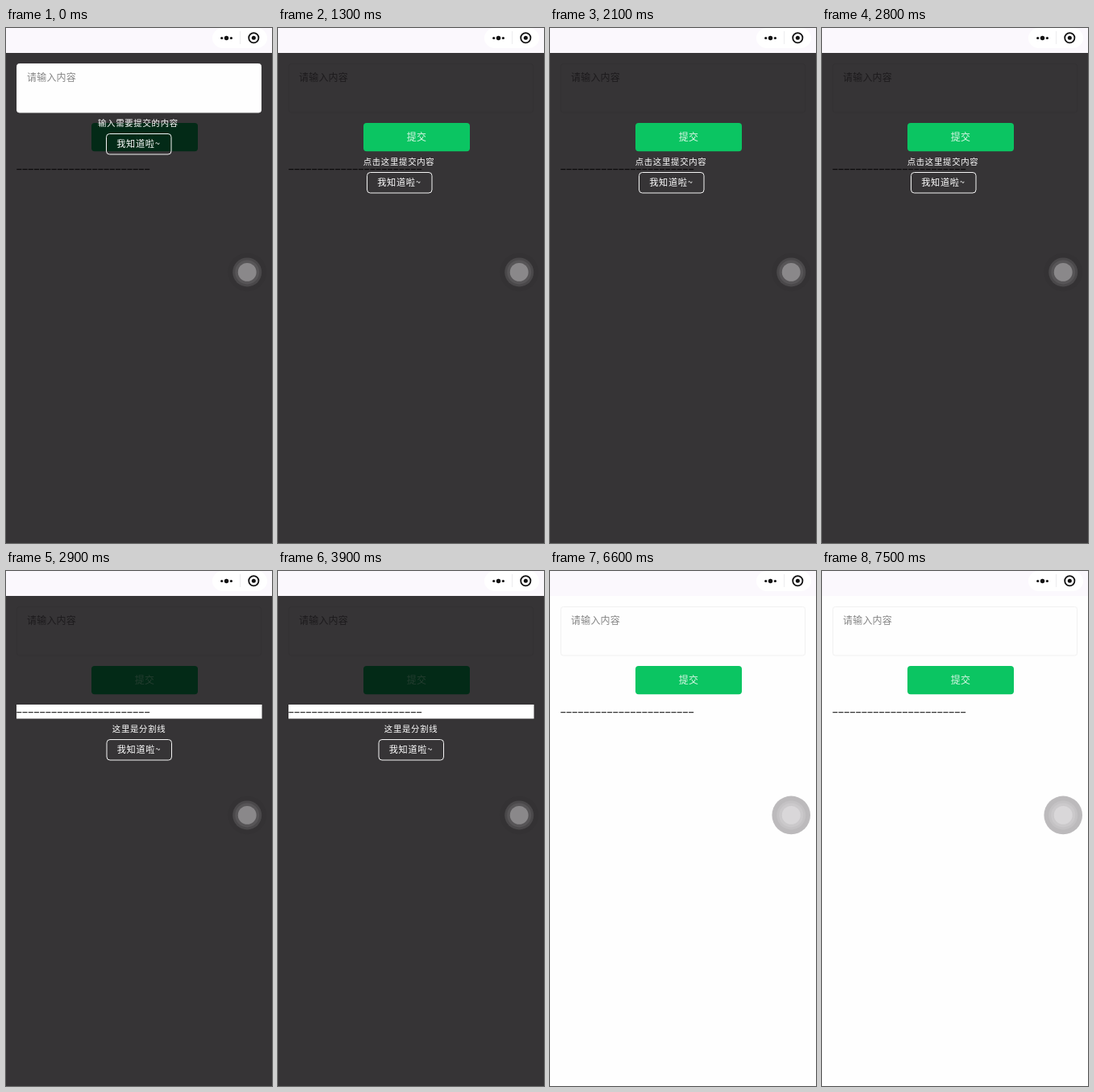
Write an HTML page that moves like this. It is 330x640 px and loops after 7600 ms.

```html
<!DOCTYPE html>
<html lang="zh">
<head>
<meta charset="utf-8">
<style>
  html, body { margin: 0; width: 100%; height: 100%; overflow: hidden; background: #fefefe; }
  svg { display: block; }
  text { font: 12px "Noto Sans CJK SC", "Noto Sans CJK", sans-serif; letter-spacing: .2px; }
  #tip text { fill: #fff; font-size: 10.4px; letter-spacing: .7px; }
  #tip g text { font-size: 11.2px; }
</style>
</head>
<body>
<svg width="330" height="640" viewBox="0 0 330 640">
  <rect id="page" width="330" height="640"/>
  <rect width="330" height="31" fill="#fbf8fd"/>
  <rect x="256" y="0" width="68" height="25" rx="12.5" fill="#fff"/>
  <path d="M290.5 4V20" stroke="#ececee"/>
  <g fill="#111">
    <circle cx="267.7" cy="12.5" r="1.6"/>
    <circle cx="273.5" cy="12.5" r="2.7"/>
    <circle cx="279.4" cy="12.5" r="1.6"/>
    <circle cx="307.3" cy="12.3" r="2.5"/>
    <circle cx="307.3" cy="12.3" r="6.1" fill="none" stroke="#111" stroke-width="1.8"/>
  </g>

  <rect id="area" x="13.5" y="44.5" width="303" height="60.5" rx="3"/>
  <text id="hint" x="26" y="66.3">请输入内容</text>
  <rect id="button" x="106" y="118" width="132" height="35.3" rx="4"/>
  <text id="label" x="159.8" y="139.8">提交</text>
  <rect id="strip" x="13" y="166" width="304.5" height="17.5" fill="#fff"/>
  <path id="rule" d="M13.3 175.6H179" stroke-width="1.2" stroke-dasharray="6 1.22"/>

  <g id="tip">
    <text id="note"></text>
    <g id="ok">
      <rect x=".5" y=".5" width="80.5" height="25.5" rx="4" fill="none" stroke="#f4f4f4"/>
      <text x="13.2" y="17.3">我知道啦~</text>
    </g>
  </g>

  <g id="knob">
    <circle cx="299.2" cy="303.4" r="23.8"/>
    <circle cx="299.2" cy="303.4" r="18"/>
    <circle cx="299.2" cy="303.4" r="15"/>
    <circle cx="299.2" cy="303.4" r="11.4"/>
  </g>
</svg>
<script>
const $ = id => document.getElementById(id);
const LOOP = 7600;
const DARK = '#363436';
// Guide steps: start time, note and its position, confirm button position
const steps = [
  { at: 0, note: '输入需要提交的内容', pos: [114, 122], ok: [124, 131] },
  { at: 1300, note: '点击这里提交内容', pos: [105.7, 170], ok: [110, 179] },
  { at: 2900, note: '这里是分割线', pos: [131.8, 200.4], ok: [124.5, 209] },
  { at: 6600 }
];
const knobDark = ['#343234', '#4a484a', '#575557', '#8a888a'];
const knobLight = ['#bcbabc', '#c4c2c4', '#cbc9cb', '#d9d7d9'];
let shown = -1;

const fill = (id, color) => $(id).setAttribute('fill', color);

function show(n) {
  const step = steps[n], plain = n === 3;
  const lit = k => plain || n === k;
  fill('page', plain ? '#fefefe' : DARK);
  fill('area', lit(0) ? '#fefefe' : DARK);
  $('area').setAttribute('stroke', lit(0) ? '#f1f1f1' : '#333133');
  fill('hint', lit(0) ? '#858585' : '#1d1b1d');
  fill('button', lit(1) ? '#0bc562' : '#032a17');
  fill('label', lit(1) ? '#dcf7e7' : n ? '#243d30' : '#0a2f1c');
  $('rule').setAttribute('stroke', lit(2) ? '#333' : '#0c0b0c');
  $('strip').style.display = n === 2 ? '' : 'none';
  [...$('knob').children].forEach((c, i) => c.setAttribute('fill', (plain ? knobLight : knobDark)[i]));
  $('tip').style.display = plain ? 'none' : '';
  if (plain) return;
  $('note').textContent = step.note;
  $('note').setAttribute('x', step.pos[0]);
  $('note').setAttribute('y', step.pos[1]);
  $('ok').setAttribute('transform', `translate(${step.ok})`);
}

function tick() {
  const t = performance.now() % LOOP;
  const n = steps.filter(s => s.at <= t).length - 1;
  if (n !== shown) show(shown = n);
  requestAnimationFrame(tick);
}
tick();
</script>
</body>
</html>
```
